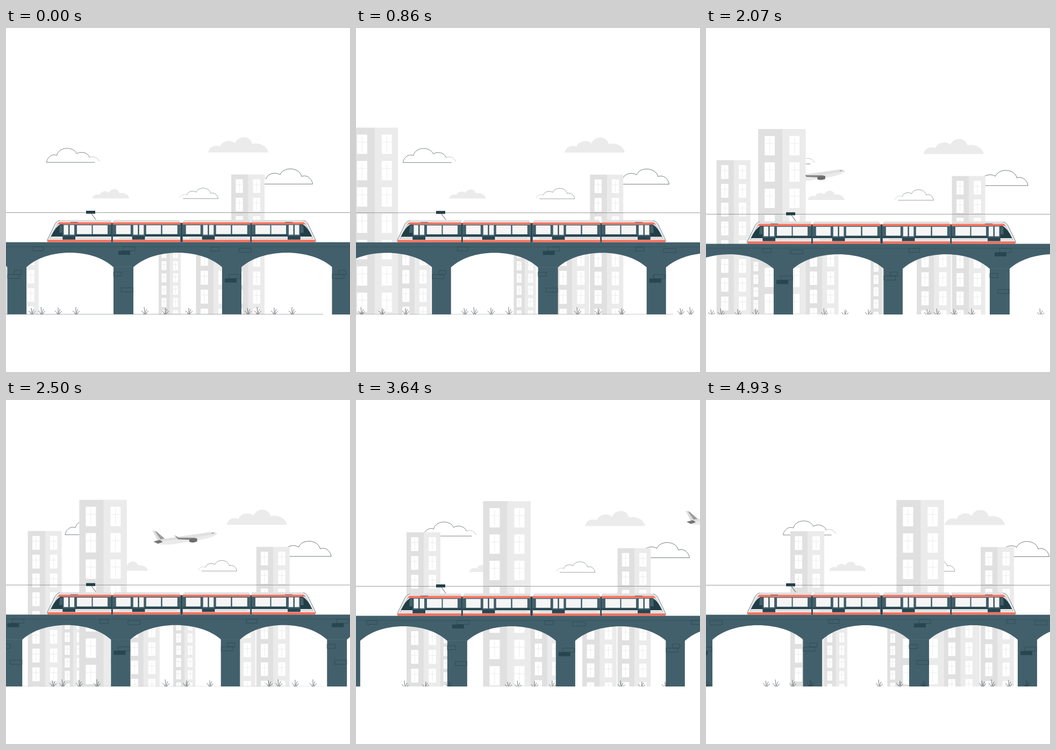
An HTML page with a canvas for the animation above (5 s loop, 640 by 640 pixels).

```html
<!DOCTYPE html>
<html lang="en">
<head>
<meta charset="utf-8">
<title>Train on a viaduct</title>
<style>
html, body { margin: 0; width: 100%; height: 100%; overflow: hidden; background: #fff; }
canvas { display: block; }
</style>
</head>
<body>
<canvas id="stage" width="640" height="640"></canvas>
<script>
const ctx = document.getElementById('stage').getContext('2d');
const INK = '#263238', TEAL = '#42606b', DARK = '#284650', RED = '#ff725e';

function rect(x, y, w, h, color) {
  ctx.fillStyle = color;
  ctx.fillRect(x, y, w, h);
}
function fill(path, color) {
  ctx.fillStyle = color;
  ctx.fill(new Path2D(path));
}
function stroke(path, color = INK, width = 0.6) {
  ctx.strokeStyle = color;
  ctx.lineWidth = width;
  ctx.stroke(new Path2D(path));
}
function at(x, y, sx, sy, draw) {
  ctx.save();
  ctx.translate(x, y);
  ctx.scale(sx, sy);
  draw();
  ctx.restore();
}

// Clouds: origin at the left end of the base line
const softCloud = () =>
  fill('M0 0C2-10 12-15 22-11C26-22 42-25 50-17C56-32 78-32 82-16C92-19 110-14 112 0Z', '#ebebeb');

function lineCloud() {
  stroke('M91 0H1C2-9 11-17 20-13C24-30 52-30 57-16C64-21 78-19 81-9');
  stroke('M81-9C88-13 97-8 99-2', '#9aa1a4');
}

function clouds(n) {
  const x = 0.549 * n;
  at(376 + x, 231.5, 1, 1, softCloud);
  at(161 + x, 317, 0.61, 0.61, softCloud);
  at(74.5 + x, 250, 1, 1, lineCloud);
  at(571.5 + x, 290.3, -1.08, 1.08, lineCloud);
  at(395.5 + x, 317.5, -0.73, 0.75, lineCloud);
}

function plane(n) {
  const d = n - 72;
  at(12.16 * d, -1.4 * d - 2.9, 1, 1, () => {
    fill('M382 232L390 235L405 248L392 252Z', '#dcdcdc');
    fill('M386 233L390 235L405 248L397 249Z', '#9c9c9c');
    fill('M502 238C498 234 490 235 480 237L430 244L398 249L386 254Q390 260 420 258L470 250Q500 244 502 238Z', '#e0e0e0');
    fill('M386 254Q390 260 420 258L470 250Q500 244 502 238Q470 246 386 254Z', '#ebebeb');
    fill('M384 253L396 250L401 254L392 257Z', '#757575');
    fill('M422 241L431 246L463 246L454 250L430 249Z', '#858585');
    fill('M450 250Q453 247 465 247V253Q458 256 451 254Z', '#6b6b6b');
    stroke('M492 238L496 237', '#777', 1);
  });
}

// Tower is 88.5 wide at scale 1 and reaches below the ground
function tower(x, top, s) {
  at(x, top, s, s, () => {
    rect(0, 0, 45.5, 900, '#e0e0e0');
    rect(45, 0, 43.5, 900, '#ebebeb');
    for (let y = 13; y * s + top < 534; y += 49)
      for (const wx of [12, 58]) {
        rect(wx, y, 19, 36, '#fff');
        stroke(`M${wx + 9.5} ${y + 3}V${y + 33}M${wx + 1} ${y + 14}H${wx + 18}`, '#e0e0e0', 0.6 / s);
      }
  });
}

function towers(n) {
  tower(284 + 0.43 * n, 405, 0.465);
  const far = 419 + 0.742 * n, mid = -79.5 + 1.906 * n, near = -88.8 + 3.574 * n;
  tower(far - 65.5, 407, 0.72);
  tower(far, 272.5, 0.7);
  tower(mid + 63, 402, 0.485);
  tower(mid, 243, 0.713);
  tower(near + 88, 407, 0.695);
  tower(near, 185, 1);
}

function brick(x, y, w, solid) {
  if (solid) rect(x, y, w, 7.5, DARK);
  else stroke(`M${x} ${y}h${w}v7.5h${-w}z`, '#263e48');
}

function viaduct(n) {
  const shift = 6.306 * n % 604;
  for (let i = -2; i < 2; i++) at(shift + 604 * i, 0, 1, 1, () => {
    let deck = 'M2.5 398.5H607.5V445';
    for (const [l, r] of [[438, 607], [237, 402], [38, 200]]) {
      const m = (l + r) / 2;
      deck += `H${r}C${r - 20} 427 ${m + 32} 418 ${m} 418S${l + 20} 427 ${l} 445`;
    }
    fill(deck + 'H2.5Z', TEAL);
    for (const [x, w] of [[2.5, 35.5], [200, 37], [402, 36]]) rect(x, 444.5, w, 100, TEAL);
    stroke('M3 407H607', '#2f4b56');
    stroke('M200 444.5H237', '#56737d');
    brick(50, 407, 19.5);
    brick(209, 414.5, 22, true);
    brick(218, 407, 22);
    brick(381.5, 407.5, 15.5);
    brick(433.5, 410, 23);
    brick(15, 451, 13.5);
    brick(3, 458.5, 22);
    brick(200, 454, 15);
    brick(214.5, 483.5, 22);
    brick(407, 466, 22, true);
    brick(415, 458.5, 22);
  });
}

function grass(n) {
  const shift = 7 * n % 402;
  for (let i = -2; i < 2; i++)
    for (const x of [48, 66, 97, 130, 258, 296, 340])
      at(x + shift + 402 * i, 533, 1, 1, () => {
        const lean = x % 3 - 1;
        stroke(`M-1 0Q-2-4-6-7M0 0Q0-6 ${lean}-${12 + x % 4}M1 0Q1-6 4-10M2 0Q3-4 7-6`, INK, 0.65);
      });
  stroke('M0 532.6H590', '#7d878b', 0.7);
}

const MID = 326.5;
const mirrored = draw => at(2 * MID, 0, -1, 1, draw);
const pane = (x, w) => rect(x, 367, w, 16.5, '#f5f5f5');

function door(x) {
  rect(x, 365.5, 23.5, 28, TEAL);
  rect(x, 387, 23.5, 6.5, DARK);
  for (const dx of [2, 13]) rect(x + dx, 366.5, 8.5, 18, '#f5f5f5');
  stroke(`M${x + 11.7} 366V393`, DARK, 0.8);
}

function sides(x, w) {
  rect(x, 365.3, w, 22.7, TEAL);
  rect(x, 384, w, 4, DARK);
}

function endCar() {
  fill('M196 357.5H102Q95 358 91 365L77 394Q76 398 80 398.5H196Z', '#ebebeb');
  stroke('M102 357.5Q95 358 91 365L77 394Q76 398 80 398.3', '#5a6a71', 0.8);
  stroke('M106 360Q99 360 95 367L82 392', '#87949a', 0.6);
  rect(100, 357, 96, 4.5, '#e0e0e0');
  fill('M101 365.3H196V388H84Z', TEAL);
  rect(104, 384, 92, 4, DARK);
  fill('M101 365.3H106V388H83.5Q92 370 101 365.3Z', '#213e47');
  fill('M100 367H105V381H99Z', TEAL);
  fill('M99 361.5H196V365.3H95Z', RED);
  stroke('M120 361.5H134', DARK, 0.8);
  door(105.5);
  pane(132, 27.5);
  pane(161.5, 27.5);
  stroke('M82 391H105M130 391H196', '#aab2b5');
  fill('M78 394H196V398.5H80Q76 398 78 394Z', RED);
}

function middleCar(x) {
  rect(x, 361, 125.5, 37.5, '#ebebeb');
  fill(`M${x + 3} 357h120l2.5 4.5h-125.5z`, '#e0e0e0');
  sides(x, 125.5);
  rect(x, 361.5, 125.5, 3.8, RED);
  pane(x + 6, 27);
  door(x + 36);
  pane(x + 62, 27.5);
  pane(x + 92, 28);
  stroke(`M${x + 12} 391h22M${x + 62} 391h58`, '#aab2b5');
  rect(x, 394, 125.5, 4.5, RED);
}

function train() {
  rect(195, 362.5, 263, 36, DARK);
  endCar();
  mirrored(endCar);
  middleCar(198.8);
  middleCar(328.8);
  stroke('M0 343.5H640', '#808080', 0.8);
  rect(149, 340, 17, 5.5, '#213e47');
  stroke('M159 345.5L167 356.5', INK, 0.8);
}

function draw(n) {
  ctx.clearRect(0, 0, 640, 640);
  ctx.save();
  ctx.beginPath();
  ctx.rect(0, 0, 640, 533);
  ctx.clip();
  // The whole scene rocks once every 20 steps
  ctx.translate(0, 1.6 * (1 - Math.cos(Math.PI * n / 10)));
  clouds(n);
  plane(n);
  towers(n);
  train();
  viaduct(n);
  grass(n);
  ctx.restore();
}

// 70 held pictures per 5 s loop, each taken from a 25 fps timeline
function tick() {
  const t = performance.now() % 5000;
  const held = Math.floor((t + 5) * 0.014) % 70;
  draw(Math.ceil(Math.round(held * 50 / 7) / 4));
  requestAnimationFrame(tick);
}
tick();
</script>
</body>
</html>
```
